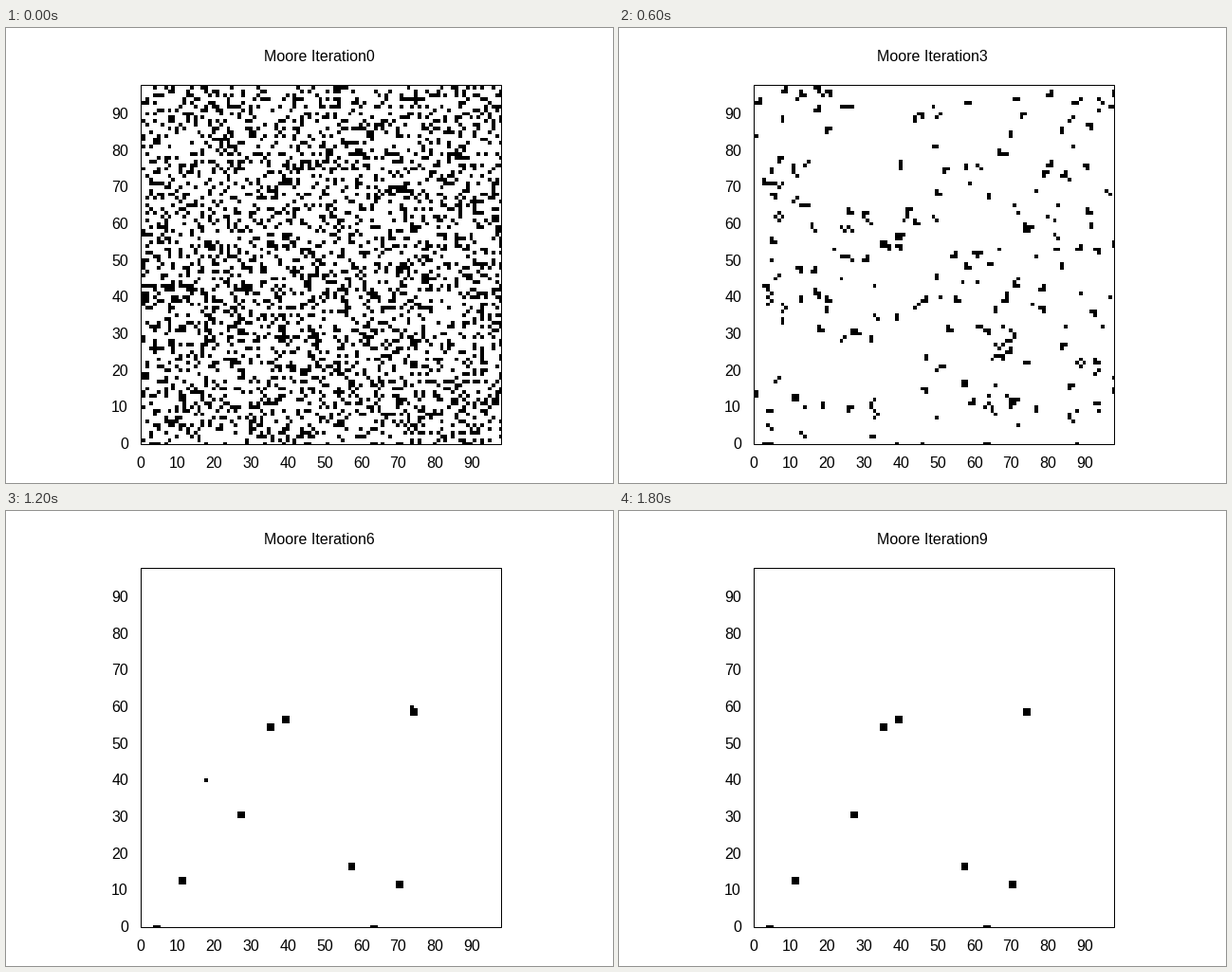
Write a matplotlib script that moves like this. It is 640 by 480 pixels and loops after 2 s.

```python
import numpy as np
import matplotlib.pyplot as plt
from matplotlib.animation import FuncAnimation
from matplotlib.patches import Rectangle

W, H, DPI = 640, 480, 100
LEFT, RIGHT, TOP, BOTTOM = 142, 522, 60, 439
SIZE, SPAN = 100, 98
SX, SY = (RIGHT - LEFT) / SPAN, (BOTTOM - TOP) / SPAN
STEPS, SETTLED = 10, 7
FONT = dict(family="Liberation Sans", size=16 * 72 / DPI, color="black",
            va="baseline")

# Lower left cells of the stable 2x2 blocks
BLOCKS = [(11, 12), (35, 54), (39, 56), (27, 30), (74, 58), (57, 16),
          (70, 11), (4, -1), (63, -1)]


def block_grid():
    grid = np.zeros((SIZE, SIZE), bool)
    for x, y in BLOCKS:
        grid[np.ix_([y, y + 1], [x, x + 1])] = True
    return grid


def survivors(grid):
    """Live cells with two or three live Moore neighbours."""
    near = sum(np.roll(grid.astype(int), (j, i), (0, 1))
               for j in (-1, 0, 1) for i in (-1, 0, 1)) - grid
    return grid & ((near == 2) | (near == 3))


def build_states():
    rng = np.random.default_rng(4)
    blocks = block_grid()
    states = [(rng.random((SIZE, SIZE)) < 0.27) | blocks]
    for i in range(1, STEPS):
        # Fewer survivors each step until only the blocks are left
        keep = rng.random((SIZE, SIZE)) < 1 - (i / SETTLED) ** 2
        states.append(survivors(states[-1]) & keep | blocks)
    return states


STATES = build_states()

# Cell shown at each pixel inside the border
COLS = np.floor((np.arange(LEFT + 1, RIGHT) - LEFT + 1) / SX + 0.5).astype(int)
ROWS = np.floor((BOTTOM - 1 - np.arange(TOP + 1, BOTTOM)) / SY + 0.5).astype(int)


def picture(i):
    return STATES[i][np.ix_(ROWS, COLS)]


fig = plt.figure(figsize=(W / DPI, H / DPI), dpi=DPI, facecolor="white")
ax = fig.add_axes([0, 0, 1, 1])
ax.axis("off")

image = ax.imshow(picture(0), cmap="gray_r", vmin=0, vmax=1, aspect="auto",
                  interpolation="nearest",
                  extent=(LEFT + 1, RIGHT, BOTTOM, TOP + 1))
ax.set_xlim(0, W)
ax.set_ylim(H, 0)
ax.add_patch(Rectangle((LEFT + 0.5, TOP + 0.5), RIGHT - LEFT, BOTTOM - TOP,
                       fill=False, edgecolor="black", linewidth=72 / DPI,
                       snap=False))

for v in range(0, SPAN, 10):
    ax.text(LEFT + v * SX, 464, str(v), ha="center", **FONT)
    ax.text(129, BOTTOM + 5 - v * SY, str(v), ha="right", **FONT)
title = ax.text(272, 35, "", ha="left", **FONT)


def draw(i):
    image.set_data(picture(i))
    title.set_text(f"Moore Iteration{i}")
    return image, title


anim = FuncAnimation(fig, draw, frames=STEPS, interval=200,
                     repeat=True, repeat_delay=0)
plt.show()
```
